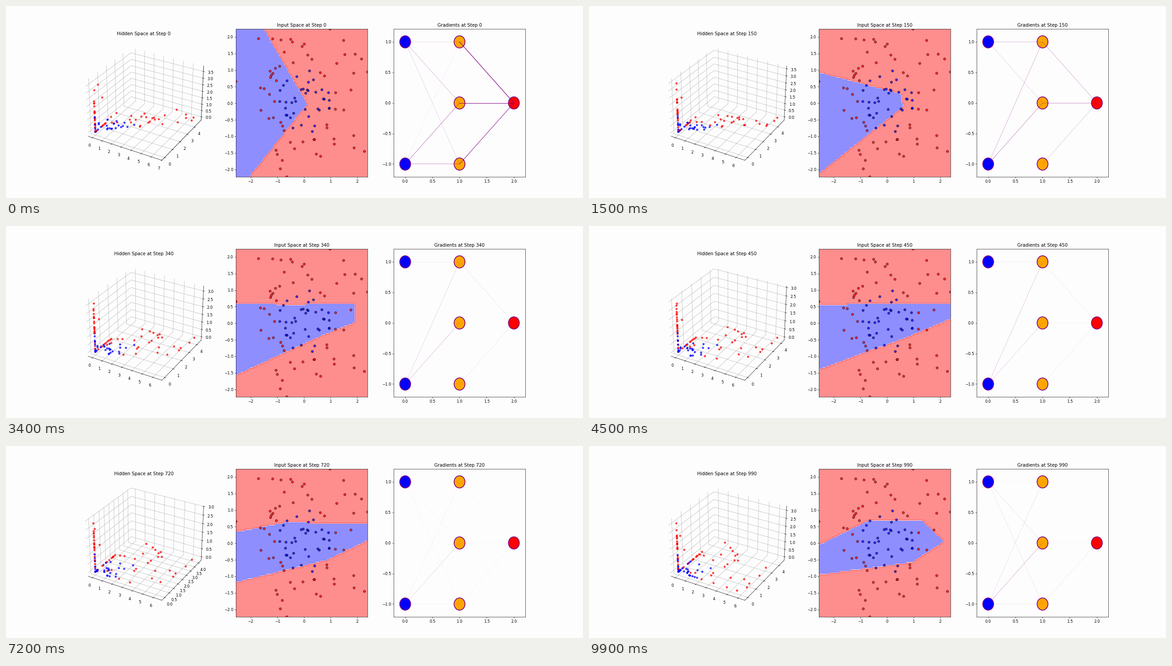
Animation, 1280 px wide and 427 px high, one loop 10000 ms. Source, as a matplotlib script:

```python
from itertools import product

import numpy as np
import matplotlib.pyplot as plt
from matplotlib.animation import FuncAnimation

FRAMES, STEPS_PER_FRAME = 100, 10
N = 100
DPI = 1280 / 21
PAPER = "#fdfdfd"

X = np.random.RandomState(0).randn(N, 2)
T = np.where((X ** 2).sum(axis=1, keepdims=True) > 1, 1.0, -1.0)

LOW, HIGH = X.min(axis=0), X.max(axis=0)
GX, GY = np.meshgrid(np.linspace(LOW[0], HIGH[0], 100),
                     np.linspace(LOW[1], HIGH[1], 100))
GRID = np.column_stack([GX.ravel(), GY.ravel()])

# Key points (x, y) that the decision boundary passes at some moments.
KEY_POINTS = {
    0: [(-1, 1.57), (-.5, .74), (-1.5, .54), (-2.4, .78)],
    15: [(-2, 1.09), (0, .42), (-1, -1.11)],
    45: [(-2, .51), (0, .55), (-2, -1.11), (1, -.31)],
    99: [(-1.6, .3), (.3, .64), (1.7, .34), (0, -.66), (-2, -1)],
}


def sigmoid(z):
    return 0.5 + 0.5 * np.tanh(z / 2)


# Error signal at the output for different losses.
ERRORS = [
    lambda z: z - T,
    lambda z: np.tanh(z) - T,
    lambda z: (np.tanh(z) - T) * (1 - np.tanh(z) ** 2),
    lambda z: sigmoid(z) - (T + 1) / 2,
    lambda z: sigmoid(z) - T,
]
RATES = [.02, .05, .1, .2, .5, 1]
GAINS = [1, (2 / 3) ** .5]
# Whether the hidden layer learns through the already updated output weights.
FRESH = [False, True]


def hidden(points, w1, b1):
    return np.maximum(points @ w1 + b1, 0)


def train(error):
    """Train a 2-3-1 ReLU network for every setting at once, log them all."""
    settings = np.array(list(product(RATES, GAINS, FRESH)))
    rate, gain, fresh = settings.T[:, :, None, None]
    rng = np.random.RandomState(0)
    k = len(settings)
    w1 = np.tile(rng.randn(2, 3), (k, 1, 1))
    w2 = gain * rng.randn(3, 1)
    b1, b2 = np.zeros((k, 1, 3)), np.zeros((k, 1, 1))
    log = []
    for step in range(1, STEPS_PER_FRAME * (FRAMES + 1) + 1):
        h = hidden(X, w1, b1)
        d = error(h @ w2 + b2) / N
        g2 = h.transpose(0, 2, 1) @ d
        back = w2 - fresh * rate * g2
        dh = (d @ back.transpose(0, 2, 1)) * (h > 0)
        g1 = X.T @ dh
        w1, w2 = w1 - rate * g1, w2 - rate * g2
        b1 = b1 - rate * dh.sum(axis=1, keepdims=True)
        b2 = b2 - rate * d.sum(axis=1, keepdims=True)
        if step % STEPS_PER_FRAME == 0:
            log.append((w1, b1, w2, b2, g1, g2))
    return [np.stack(part, axis=1) for part in zip(*log)]


def best_run():
    """Return the training whose boundary passes closest to the key points."""
    moments = np.repeat(list(KEY_POINTS), [len(p) for p in KEY_POINTS.values()])
    points = np.array(sum(KEY_POINTS.values(), []))[:, None]
    best, smallest = None, np.inf
    for error in ERRORS:
        run = train(error)
        for shift in (0, 1):
            w1, b1, w2, b2 = (p[:, moments + shift] for p in run[:4])
            h = hidden(points, w1, b1)
            out = (h @ w2 + b2)[..., 0, 0]
            slope = ((h > 0) * w2.swapaxes(2, 3)) @ w1.swapaxes(2, 3)
            gap = np.abs(out) / np.linalg.norm(slope[..., 0, :], axis=-1)
            total = np.where(gap < 0.5, gap, 0.5).sum(axis=1)
            i = total.argmin()
            if total[i] < smallest:
                smallest = total[i]
                best = [p[i, shift:shift + FRAMES] for p in run]
    return best


with np.errstate(all="ignore"):
    W1, B1, W2, B2, G1, G2 = best_run()
LINE_SCALE = 1.4 / max(np.abs(G1[0]).max(), np.abs(G2[0]).max())

fig = plt.figure(figsize=(1280.01 / DPI, 427.01 / DPI), dpi=DPI,
                 facecolor=PAPER)
ax_hidden = fig.add_subplot(131, projection="3d", facecolor=PAPER)
ax_input = fig.add_subplot(132, facecolor=PAPER)
ax_grad = fig.add_subplot(133, facecolor=PAPER)

dots = ax_input.scatter(X[:, 0], X[:, 1], c=T.ravel(), cmap="bwr",
                        edgecolors="k", alpha=0.7, zorder=2)
ax_input.set_xlim(LOW[0], HIGH[0])
ax_input.set_ylim(LOW[1], HIGH[1])

INPUTS = [(0, -1), (0, 1)]
HIDDEN = [(1, -1), (1, 0), (1, 1)]
OUTPUT = (2, 0)
for nodes, color in ((INPUTS, "blue"), (HIDDEN, "orange"), ([OUTPUT], "red")):
    for node in nodes:
        ax_grad.add_patch(plt.Circle(node, 0.1, fc=color, ec="purple", lw=2))


def edge(a, b):
    return ax_grad.plot([a[0], b[0]], [a[1], b[1]], color="purple", lw=0)[0]


edges = [edge(a, b) for a in INPUTS for b in HIDDEN]
edges += [edge(a, OUTPUT) for a in HIDDEN]
ax_grad.set_xlim(-0.21, 2.21)
ax_grad.set_ylim(-1.21, 1.21)


def draw(i):
    step = i * STEPS_PER_FRAME

    ax_hidden.clear()
    ax_hidden.scatter(*hidden(X, W1[i], B1[i]).T, c=T.ravel(), cmap="bwr",
                      alpha=0.7)
    for axis in (ax_hidden.xaxis, ax_hidden.yaxis, ax_hidden.zaxis):
        axis.set_pane_color(PAPER)
    ax_hidden.set_title(f"Hidden Space at Step {step}")

    for old in [c for c in ax_input.collections if c is not dots]:
        old.remove()
    out = hidden(GRID, W1[i], B1[i]) @ W2[i] + B2[i]
    side = np.where(out < 0, -1.0, 1.0).reshape(GX.shape)
    ax_input.contourf(GX, GY, side, cmap="bwr", alpha=0.5)
    ax_input.set_title(f"Input Space at Step {step}")

    grads = np.concatenate([G1[i].ravel(), G2[i].ravel()])
    for line, g in zip(edges, grads):
        line.set_linewidth(LINE_SCALE * abs(g))
    ax_grad.set_title(f"Gradients at Step {step}")
    return []


anim = FuncAnimation(fig, draw, frames=FRAMES, interval=100, repeat=True)
plt.show()
```
